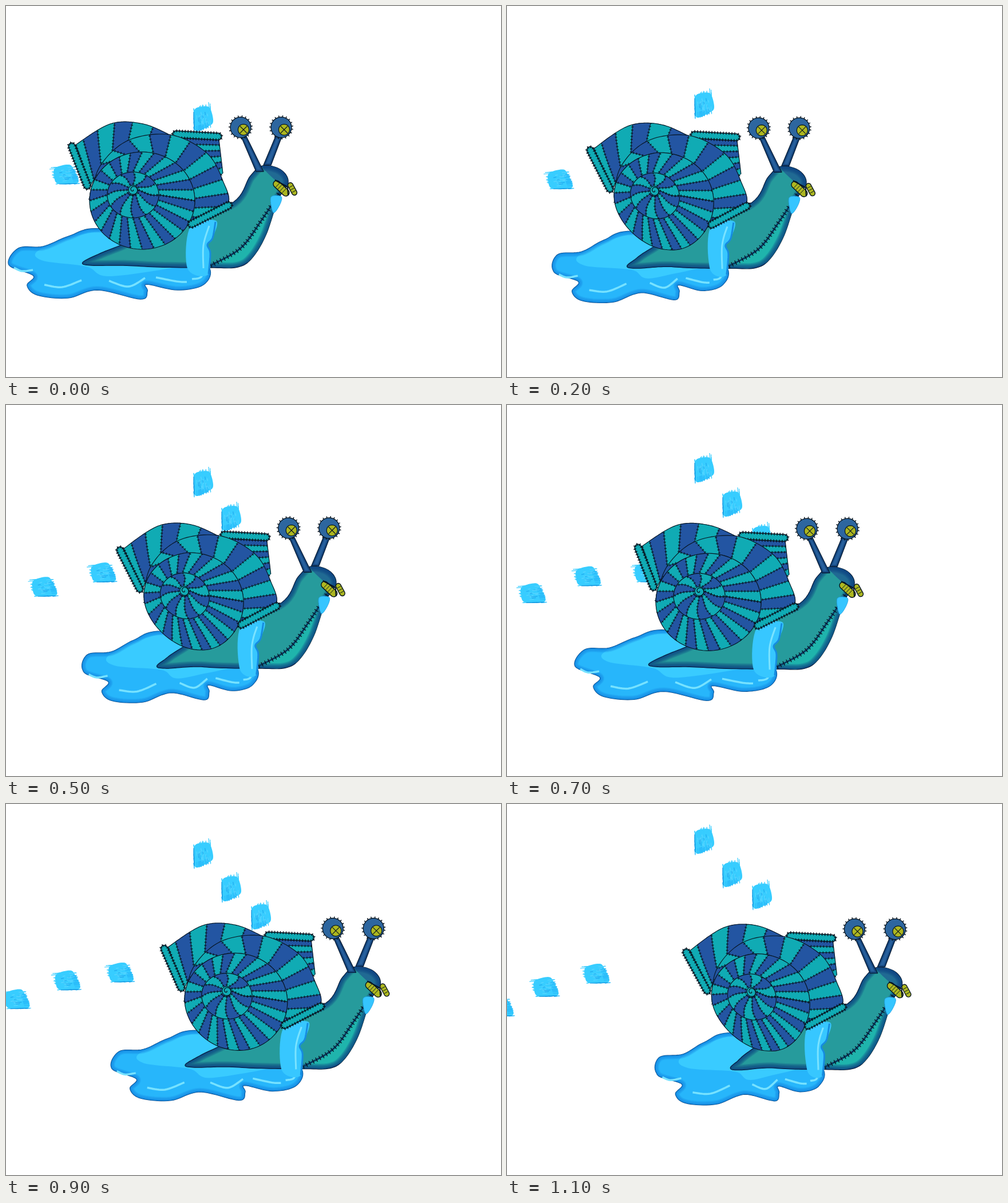
Recreate the animation shown at these times as an HTML page with a canvas. Size 865 px wide and 648 px high, loop 1.2 s.

```html
<!DOCTYPE html>
<html lang="en">
<head>
<meta charset="utf-8">
<title>Stitched snail</title>
<style>
html, body { margin: 0; width: 100%; height: 100%; overflow: hidden; background: #fff; }
canvas { display: block; }
</style>
</head>
<body>
<canvas id="stage" width="865" height="648"></canvas>
<script>
const ctx = document.getElementById('stage').getContext('2d');
const TEAL = '#10abb4', NAVY = '#2355a2', INK = '#071420', OLIVE = '#adb720';
const STEP = 100, STEPS = 12, STRIDE = 7;
const { PI, sin, cos, hypot, floor } = Math;

const clamp = (v, lo = 0, hi = 1) => Math.min(hi, Math.max(lo, v));
const mix = (a, b, t) => [a[0] + (b[0] - a[0]) * t, a[1] + (b[1] - a[1]) * t];
const range = (n, f) => Array.from({ length: n + 1 }, (_, i) => f(i / n));

let step = 0, travel = 0, sink = 0, pull = 0;

// The body speeds up in small pulses; the tail is drawn in once per stride.
function pose(s) {
  step = s;
  travel = 14.2 * s + .37 * s * s + 3.5 * sin(PI / 2 * s);
  sink = .6 * s;
  pull = s < STRIDE ? 57 * sin(PI * s / STRIDE) ** .8 : 60 * ((s - STRIDE) / 4) ** 1.7;
}

// Moves a resting point to its place in the current pose.
function warp([x, y]) {
  const back = clamp((350 - x) / 200), low = clamp((y - 220) / 230) ** 2;
  return [x + travel + pull * back * low, y + sink + pull * .23 * clamp((230 - x) / 220)];
}

// Catmull-Rom curve through a flat list of coordinates.
function spline(flat, closed) {
  const n = flat.length / 2, segs = closed ? n : n - 1;
  const get = (i, k) => flat[2 * (closed ? (i + n) % n : clamp(i, 0, n - 1)) + k];
  return range(segs * 10, u => {
    const i = Math.min(floor(u * segs), segs - 1), t = u * segs - i;
    return [0, 1].map(k => {
      const a = get(i - 1, k), b = get(i, k), c = get(i + 1, k), d = get(i + 2, k);
      return .5 * (2 * b + (c - a) * t + (2 * a - 5 * b + 4 * c - d) * t * t + (3 * b - a - 3 * c + d) * t ** 3);
    });
  });
}

function along(pts) {
  return u => {
    const f = clamp(u) * (pts.length - 1), i = Math.min(floor(f), pts.length - 2);
    return mix(pts[i], pts[i + 1], f - i);
  };
}

const ring = (cx, cy, rx, ry = rx, from = 0, sweep = 2 * PI) => u =>
  [cx + rx * cos(from + sweep * u), cy + ry * sin(from + sweep * u)];

function trace(pts, closed) {
  ctx.beginPath();
  for (const p of pts) ctx.lineTo(...warp(p));
  if (closed) ctx.closePath();
}

function stroke(color, width) {
  ctx.strokeStyle = color;
  ctx.lineWidth = width;
  ctx.stroke();
}

function line(pts, color, width) {
  trace(pts);
  stroke(color, width);
}

function shape(pts, fill, edge, width = 1) {
  trace(pts, true);
  ctx.fillStyle = fill;
  ctx.fill();
  if (edge) stroke(edge, width);
}

// Soft darkening towards the rim, inside the shape only.
function rim(pts, color, depth) {
  ctx.save();
  trace(pts, true);
  ctx.clip();
  ctx.globalAlpha = .2;
  for (let w = depth; w > 1; w -= depth / 7) stroke(color, w);
  ctx.restore();
}

// Short ticks across a path.
function stitch(pts, gap, len, width = 1.2) {
  let left = gap / 2;
  ctx.beginPath();
  for (let i = 1; i < pts.length; i++) {
    const a = warp(pts[i - 1]), b = warp(pts[i]), d = hypot(b[0] - a[0], b[1] - a[1]);
    for (; left < d; left += gap) {
      const [x, y] = mix(a, b, left / d);
      const nx = (a[1] - b[1]) / d * len / 2, ny = (b[0] - a[0]) / d * len / 2;
      ctx.moveTo(x - nx, y - ny);
      ctx.lineTo(x + nx, y + ny);
    }
    left -= d;
  }
  stroke(INK, width);
}

// Alternating patches sewn between two curves; a higher power makes the first ones narrower.
function patches(inner, outer, count, { first = 0, power = 1, bend = 0 } = {}) {
  const colors = [NAVY, TEAL];
  const edge = u => range(8, k => mix(inner(u + bend * sin(PI * k)), outer(u + bend * sin(PI * k)), k));
  const run = (f, a, b) => range(6, k => f(a + (b - a) * k));
  const cut = i => (i / count) ** power;
  for (let i = 0; i < count; i++) {
    const a = cut(i), b = cut(i + 1), fill = colors[(i + first) % 2];
    shape([...edge(a), ...run(outer, a, b), ...edge(b).reverse(), ...run(inner, b, a)], fill, fill, .7);
  }
  for (let i = 0; i <= count; i++) {
    line(edge(cut(i)), INK, 1);
    stitch(edge(cut(i)), 5.5, 4);
  }
  for (const f of [inner, outer]) line(range(90, f), INK, 1.1);
}

// Bar with round ends.
function capsule(a, b, width) {
  const t = Math.atan2(b[1] - a[1], b[0] - a[0]);
  const cap = (p, from) => range(8, ring(...p, width / 2, width / 2, t + from, PI));
  const pts = [...cap(b, -PI / 2), ...cap(a, PI / 2)];
  return [...pts, pts[0]];
}

function flange(a, b) {
  const pts = capsule(a, b, 12);
  shape(pts, TEAL, INK, 1.5);
  stitch(pts, 5, 5, 1.5);
}

const puddle = spline([165, 389, 110, 402, 65, 420, 22, 423, 5, 452, 48, 471, 37, 488, 55, 505, 108, 510,
  160, 496, 235, 512, 247, 498, 246, 486, 300, 496, 346, 486, 354, 455, 300, 415], true);
const shallow = spline([62, 424, 165, 394, 250, 420, 335, 445, 185, 472, 140, 455, 62, 444], true);
const glints = [
  [14, 457, 28, 463, 47, 461], [67, 487, 98, 491, 132, 479], [180, 480, 214, 490, 243, 475],
  [262, 474, 298, 481, 316, 482], [325, 477, 340, 474, 346, 462]
].map(g => spline(g));
const body = spline([134, 448, 165, 432, 215, 411, 260, 380, 390, 347, 427, 297, 449, 279, 480, 286, 493, 308,
  475, 339, 454, 400, 430, 440, 405, 456, 358, 457, 270, 456, 205, 453, 150, 453], true);
const seam = spline([478, 326, 446, 375, 410, 423, 358, 453]);
const belly = [...seam, [390, 458], [430, 445], [465, 390], [480, 340]];
const brow = spline([448, 279, 480, 284, 494, 320, 468, 302], true);
const stream = spline([322, 386, 367, 375, 361, 405, 352, 417, 357, 432, 352, 470, 317, 458], true);
const streamEdge = spline([366, 377, 361, 405, 352, 417, 357, 432, 354, 468]);
const streamGlint = spline([355, 384, 345, 418, 345, 458]);
const drip = spline([463, 334, 481, 333, 478, 348, 467, 361], true);

const backOuter = along(spline([118, 245, 182, 206, 240, 206, 292, 228]));
const backInner = along(spline([145, 318, 180, 265, 230, 236, 290, 232]));
const mouthRight = along([[372, 233], [379, 292]]);
const mouthLeft = along([[310, 230], [370, 300]]);
const whorl = along(spline([146, 334, 166, 277, 215, 234, 288, 225, 350, 256, 378, 303, 386, 350, 319, 384]));
const disc = [238, 340, 92, 85], core = ring(222, 330, 45, 40), eyelet = ring(222, 321, 8);

function drawShell() {
  const discEdge = ring(...disc, PI, PI * 7 / 6);
  patches(backInner, backOuter, 7, { power: 1.75 });
  patches(mouthLeft, mouthRight, 6);
  flange([297, 224], [371, 228]);
  flange([115, 245], [142, 314]);
  patches(u => discEdge(clamp(u) ** .7), whorl, 14, { first: 1 });
  patches(core, ring(...disc), 28);
  patches(eyelet, core, 12, { bend: .02 });
  shape(range(20, eyelet), TEAL, INK);
  line(range(30, u => ring(222, 321, 11 * u, 11 * u, 0, 9)(u)), INK, 1.2);
  flange([324, 381], [389, 348]);
}

function drawBody() {
  shape(puddle, '#27b6fb', '#0b4f8c', 1.6);
  shape(shallow, '#39cbff');
  rim(puddle, '#1788e2', 14);
  for (const g of glints) line(g, '#76e2ff', 3.5);

  shape(body, '#269b9c', INK, 1.5);
  ctx.save();
  trace(body, true);
  ctx.clip();
  shape(belly, '#1fb4ac');
  shape(brow, '#206a93');
  ctx.restore();
  rim(body, '#0b3c7c', 19);
  line(seam, '#0a3a62', 3);
  stitch(seam, 6.5, 8, 1.4);

  shape(stream, '#37c7ff');
  line(streamEdge, '#168ce0', 3);
  line(streamGlint, '#7ae3ff', 3);
}

function drawEye(x, y, baseX, baseY) {
  const stalk = [[x + 1, y + 16], [x + (baseX > x ? 10 : -10), y + 16]].sort((a, b) => a[0] - b[0]);
  const pts = [...stalk, [baseX + 7, baseY], [baseX - 6, baseY]];
  shape(pts, '#27609d', INK, 1.4);
  rim(pts, '#0b3266', 7);
  const lid = range(60, ring(x, y, 18));
  stitch(lid, 6, 6, 1.5);
  shape(lid, '#2d669f', INK, 1.3);
  const px = x + 5, py = y + 4;
  shape(range(40, ring(px, py, 9.5)), OLIVE, INK, 1.2);
  for (const s of [-1, 1]) line([[px - 6, py - 6 * s], [px + 6, py + 6 * s]], INK, 1.1);
}

function drawHorn(a, b, width) {
  shape(capsule(a, b, width), OLIVE, INK, 1.4);
  stitch([a, b], 5, width - 2, 1);
}

function drawHead() {
  drawEye(410, 212, 443, 289);
  drawEye(481, 212, 456, 278);
  shape(drip, '#35c5ff', '#1f9ce0', .8);
  drawHorn([497, 313], [504, 326], 9);
  drawHorn([473, 311], [489, 326], 12);
  line([[470, 304], [492, 316], [493, 331]], INK, 2);
}

// Each splat leaves the shell at its birth step and drifts, gaining speed.
const splats = [
  { born: 0, from: [325, 168], speed: [0, -12] },
  { born: 3, from: [374, 194], speed: [0, -12.5] },
  { born: 7, from: [426, 204], speed: [0, -18] },
  { born: 0, from: [76, 276], speed: [-5, 4], gain: [-.5, .13], sideways: true },
  { born: 3, from: [164, 270], speed: [-10, 1.5], gain: [-.7, .3], sideways: true },
  { born: 7, from: [216, 274], speed: [-22, 1], sideways: true }
];
const blob = spline([4, 14, 17, 8, 31, 10, 37, 34, 27, 43, 8, 51, 3, 40], true);

function drawSplat({ born, from, speed, gain = [0, 0], sideways }) {
  const age = step - born;
  if (age < 0) return;
  const [x, y] = from.map((p, k) => p + speed[k] * age + gain[k] * age * age);
  let seed = 7;
  const rnd = () => (seed = seed * 16807 % 2147483647) / 2147483647;
  const streak = (sx, top, bottom, color) => {
    ctx.beginPath();
    ctx.moveTo(sx, top);
    ctx.lineTo(sx + 1, bottom);
    stroke(color, 1.2);
  };
  ctx.save();
  ctx.translate(x, y + (sideways ? 38 : 0));
  if (sideways) ctx.rotate(-PI / 2);
  ctx.beginPath();
  for (const p of blob) ctx.lineTo(...p);
  ctx.fillStyle = '#38cdff';
  ctx.fill();
  for (let i = 0; i < 22; i++) {
    const sx = 3 + rnd() * 31, top = 13 - sx / 6, low = 52 - sx / 3, mid = 14 + rnd() * 22;
    streak(sx, top - rnd() * 6, top + 8, '#38cdff');
    streak(sx, low - 8, low + rnd() * 3, '#2bbcfa');
    streak(sx, mid, mid + 4 + rnd() * 8, i % 3 ? '#5ad6ff' : '#1fa9ee');
  }
  streak(29, 0, 12, '#38cdff');
  streak(3, 17, 48, '#1795dd');
  ctx.restore();
}

function draw() {
  ctx.clearRect(0, 0, 865, 648);
  splats.forEach(drawSplat);
  drawBody();
  drawShell();
  drawHead();
}

ctx.lineJoin = 'round';
const start = performance.now();
let shown = -1;
function tick() {
  const now = floor(Math.max(0, performance.now() - start) / STEP) % STEPS;
  if (now !== shown) {
    shown = now;
    pose(now);
    draw();
  }
  requestAnimationFrame(tick);
}
tick();
</script>
</body>
</html>
```
